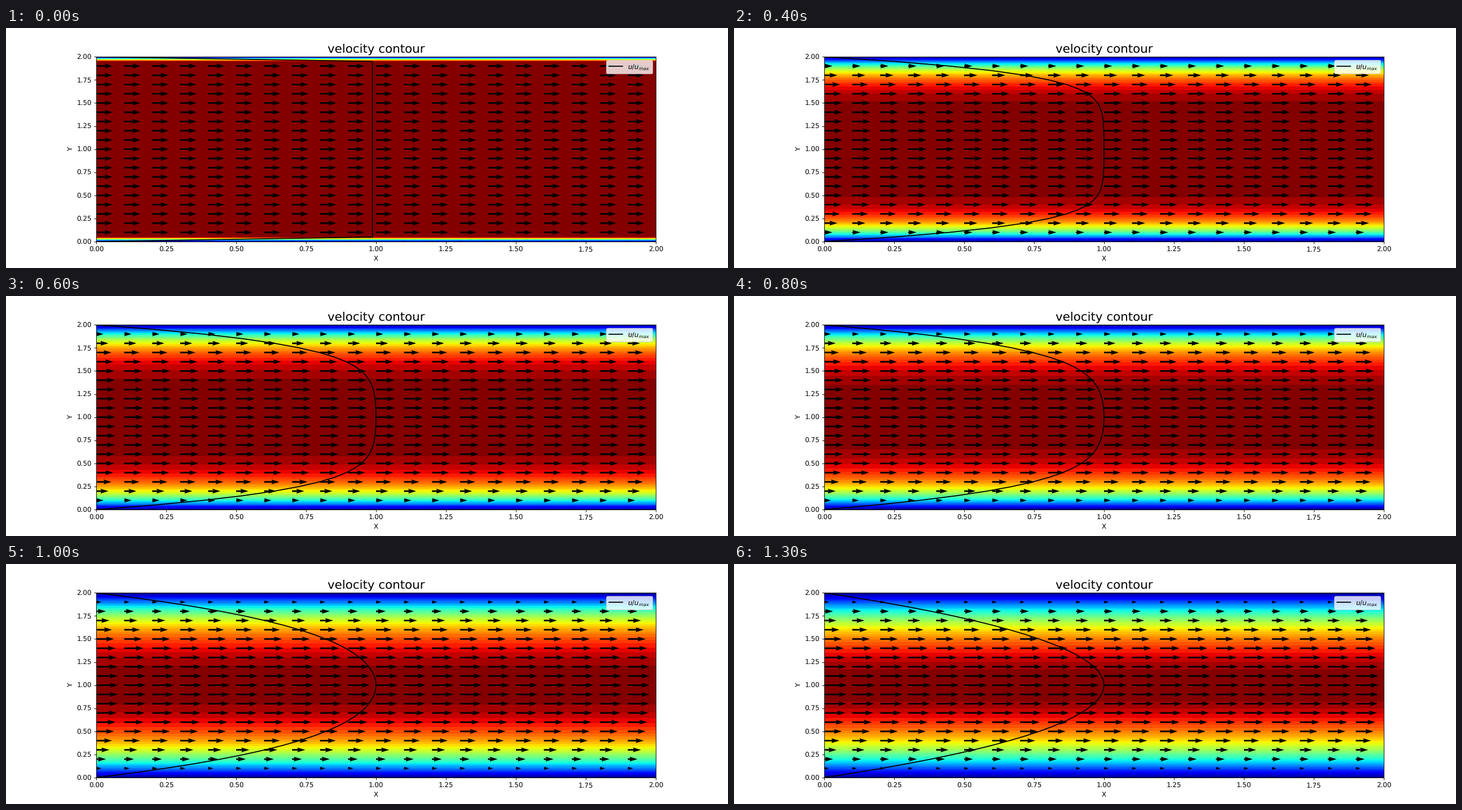
Animation, 1280 px wide and 427 px high, one loop 1400 ms. Source, as a matplotlib script:

```python
import numpy as np
import matplotlib.pyplot as plt
from matplotlib.animation import FuncAnimation

plt.rcParams["text.hinting"] = "none"

DPI = 256 / 3
FRAMES = 14
NU, FORCE, DT = 0.1, 1.0, 0.01
BANDS = 35

grid = np.linspace(0, 2, 41)
X, Y = np.meshgrid(grid, grid)
thin = (slice(None, None, 2),) * 2


def solver_step(frame):
    """Short gaps while the flow develops, long ones near the steady state."""
    return 1 + (10 * frame if frame < 10 else 100 * (frame - 8))


def velocity(steps):
    """Pressure-driven flow between two walls, starting from rest."""
    u = np.zeros_like(grid)
    r = NU * DT / (grid[1] - grid[0]) ** 2
    for _ in range(steps):
        u[1:-1] += FORCE * DT + r * (u[2:] - 2 * u[1:-1] + u[:-2])
    return u


fig, ax = plt.subplots(figsize=(15, 427 / DPI), dpi=DPI)


def draw(frame):
    u = velocity(solver_step(frame))
    top = u.max()
    field = np.repeat(u[:, None], len(grid), axis=1)

    ax.clear()
    ax.contourf(X, Y, field, levels=np.linspace(0, top, BANDS + 1),
                cmap="jet", vmin=0, vmax=0.99 * top)
    ax.quiver(X[thin], Y[thin], field[thin], np.zeros_like(field[thin]))
    # The small offset keeps the ratio finite for a fluid at rest
    ax.plot(u / (top + 1.3e-4), grid, color="black", label=r"$u/u_{max}$")
    ax.set(xlim=(0, 2), ylim=(0, 2), xlabel="X", ylabel="Y")
    ax.set_title("velocity contour", fontsize=18)
    ax.legend(loc="upper right")


anim = FuncAnimation(fig, draw, frames=FRAMES, interval=100, repeat=True,
                     repeat_delay=0, blit=False)
plt.show()
```
